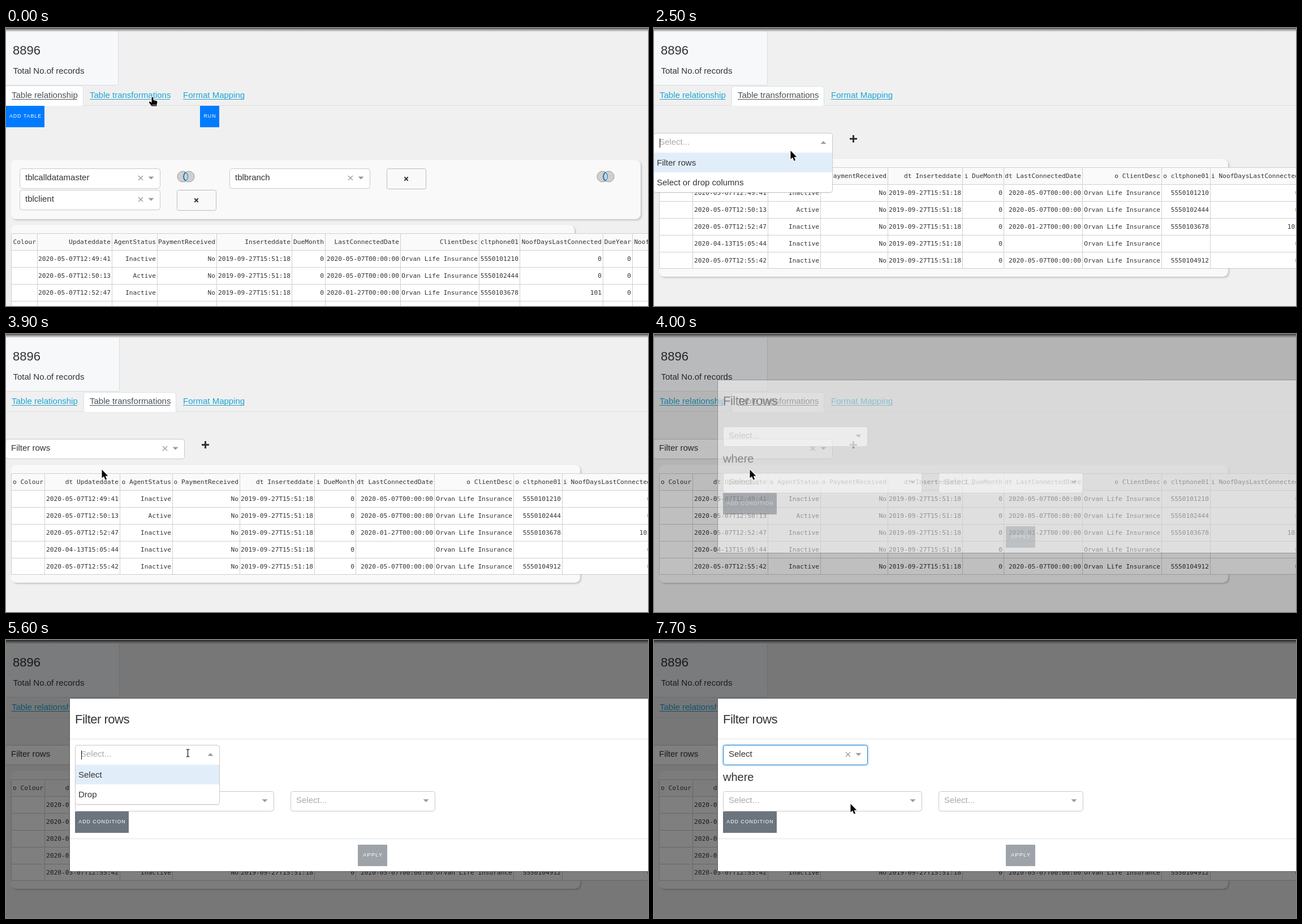
An HTML page with a canvas for the animation above (8000 ms loop, 1135x493 px).

```html
<!DOCTYPE html>
<html lang="en">
<head>
<meta charset="utf-8">
<title>Table transformations</title>
<style>
html, body { margin: 0; width: 100%; height: 100%; overflow: hidden; background: #f0f0f0; }
canvas { display: block; width: 1135px; height: 493px; }
</style>
</head>
<body>
<canvas id="stage" width="1135" height="493"></canvas>
<script>
const LOOP = 8000, W = 1135, H = 493;
const SANS = '"Liberation Sans", Arial, sans-serif';
const MONO = '"DejaVu Sans Mono", monospace';
const DARK = '#333', LINK = '#1ea5d2';
const g = document.getElementById('stage').getContext('2d');

const NAMES = ['Colour', 'Updateddate', 'AgentStatus', 'PaymentReceived', 'Inserteddate', 'DueMonth',
  'LastConnectedDate', 'ClientDesc', 'cltphone01', 'NoofDaysLastConnected', 'DueYear', 'NoofCalls'];
const TYPES = ['o', 'dt', 'o', 'o', 'dt', 'i', 'dt', 'o', 'o', 'i', 'i', 'i'];
const EDGES_PLAIN = [9, 55, 187, 267, 372, 505, 564, 697, 836, 908, 1055, 1107, 1173];
const EDGES_TYPED = [9, 68, 201, 294, 413, 545, 618, 757, 897, 983, 1142];
const row = (updated, status, last, phone, days) =>
  ['', updated, status, 'No', '2019-09-27T15:51:18', '0', last, 'Orvan Life Insurance', phone, days, '0', ''];
const MAY7 = '2020-05-07T00:00:00';
const ROWS = [
  row('2020-05-07T12:49:41', 'Inactive', MAY7, '5550101210', '0'),
  row('2020-05-07T12:50:13', 'Active', MAY7, '5550102444', '0'),
  row('2020-05-07T12:52:47', 'Inactive', '2020-01-27T00:00:00', '5550103678', '101'),
  row('2020-04-13T15:05:44', 'Inactive', '', '', '0'),
  row('2020-05-07T12:55:42', 'Inactive', MAY7, '5550104912', '0')
];

// time, x, y, shape
const POINTER = [
  [0, 257, 122, 'hand'], [1200, 255, 150, 'arrow'], [1300, 246, 196, 'arrow'], [1400, 241, 217, 'arrow'],
  [2600, 205, 228, 'arrow'], [2700, 169, 240, 'arrow'], [3100, 172, 240, 'hand'], [3400, 169, 240, 'arrow'],
  [4400, 300, 272, 'arrow'], [4500, 350, 233, 'arrow'], [4700, 332, 212, 'arrow'], [4800, 320, 199, 'arrow'],
  [5600, 321, 200, 'beam'], [6100, 292, 216, 'arrow'], [6200, 263, 235, 'hand'], [7100, 259, 235, 'arrow'],
  [7600, 305, 266, 'arrow'], [7700, 347, 290, 'arrow']
];

function text(str, x, y, size = 15, color = DARK, opt = {}) {
  g.font = `${opt.weight || 400} ${size}px ${opt.family || SANS}`;
  g.letterSpacing = `${opt.spacing || 0}px`;
  g.textAlign = opt.align || 'left';
  g.fillStyle = color;
  g.fillText(str, x, y);
  g.letterSpacing = '0px';
}

function rect(x, y, w, h, color) {
  g.fillStyle = color;
  g.fillRect(x, y, w, h);
}

function box(x, y, w, h, r, fill, stroke) {
  g.beginPath();
  g.roundRect(x + 0.5, y + 0.5, w, h, r);
  g.fillStyle = fill;
  g.fill();
  if (stroke) {
    g.strokeStyle = stroke;
    g.lineWidth = 1;
    g.stroke();
  }
}

function panel(x, y, w, h) {
  g.save();
  g.shadowColor = '#c4c4c4';
  g.shadowBlur = 3;
  g.shadowOffsetX = g.shadowOffsetY = 2;
  g.beginPath();
  g.roundRect(x, y, w, h, 9);
  g.fillStyle = '#f9f9f9';
  g.fill();
  g.restore();
}

function cross(x, y, size, color, width) {
  g.beginPath();
  g.moveTo(x - size, y - size); g.lineTo(x + size, y + size);
  g.moveTo(x + size, y - size); g.lineTo(x - size, y + size);
  g.strokeStyle = color;
  g.lineWidth = width;
  g.stroke();
}

function triangle(x, y, dir) {
  g.beginPath();
  g.moveTo(x - 5, y - 2.5 * dir);
  g.lineTo(x + 5, y - 2.5 * dir);
  g.lineTo(x, y + 2.5 * dir);
  g.fillStyle = '#999';
  g.fill();
}

function select(x, y, w, { value, focus, options, caret, pad = 10 } = {}) {
  if (focus) {
    g.beginPath();
    g.roundRect(x - 2.5, y - 2.5, w + 6, 41, 6);
    g.fillStyle = 'rgba(0,126,255,.12)';
    g.fill();
  }
  box(x, y, w, 35, options ? [4, 4, 0, 0] : 4, '#fff', focus ? '#1279c4' : '#c8c8c8');
  text(value || 'Select...', x + pad, y + 21, 15, value ? DARK : '#aaa');
  triangle(x + w - 15.5, y + 17, options ? -1 : 1);
  if (value) cross(x + w - 34, y + 17, 4, '#999', 1.3);
  if (!options) return;
  box(x, y + 35, w, 70, [0, 0, 4, 4], '#fff', '#c8c8c8');
  rect(x + 1, y + 35, w - 1, 35, '#e1eefa');
  rect(x + 1, y + 106, w - 1, 1, 'rgba(0,0,0,.07)');
  options.forEach((o, i) => text(o, x + 6, y + 58 + 35 * i));
  if (caret) rect(x + pad + 1, y + 10, 1, 16, '#111');
}

function button(label, x, y, w, color, size = 8.8) {
  rect(x, y, w, 38, color);
  text(label, x + w / 2 + 0.5, y + 21.3, size, '#fff', { align: 'center', spacing: 1 });
}

function removeButton(x, y) {
  box(x, y, 69, 36, 3, '#f9f9f9', '#bbb');
  cross(x + 34.5, y + 18.5, 3.2, '#333', 2);
}

function joinIcon(x, y) {
  const disc = dx => {
    g.beginPath();
    g.arc(x + dx, y, 9.5, 0, Math.PI * 2);
  };
  g.lineWidth = 1;
  for (const dx of [-5.5, 5.5]) {
    disc(dx);
    g.fillStyle = '#d0d0d0';
    g.fill();
    g.strokeStyle = '#999';
    g.stroke();
  }
  g.save();
  disc(-5.5); g.clip();
  disc(5.5);
  g.fillStyle = '#b5dcf6';
  g.fill();
  g.strokeStyle = '#3c6f94';
  g.lineWidth = 2;
  g.stroke();
  disc(5.5); g.clip();
  disc(-5.5);
  g.stroke();
  g.restore();
}

function table(top, edges, typed) {
  const step = 29.9, right = Math.min(edges[edges.length - 1], W + 9);
  const line = i => Math.round(top + step * i);
  rect(9, top, right - 9, 30, '#fafafa');
  rect(9, top + 30, right - 9, step * 5 - 1, '#fff');
  for (let i = 0; i <= 6; i++) rect(9, line(i), right - 8, 1, '#d0d0d0');
  for (const x of edges) rect(x, top, 1, line(6) - top + 1, '#d0d0d0');
  const head = NAMES.map((n, i) => typed ? `${TYPES[i]} ${n}` : n);
  [head, ...ROWS].forEach((cells, r) => {
    for (let c = 0; c < edges.length - 1; c++) {
      const clipped = typed && c === 9 && cells[c] === '0';
      text(cells[c], edges[c + 1] - 2, line(r) + 19, 11.2, clipped ? '#e08a35' : DARK,
        { family: MONO, align: 'right' });
    }
  });
}

function tab(label, x, w, { color = LINK, underline = true }) {
  text(label, x, 124, 15, color);
  if (underline) rect(x, 126, w, 1, color);
}

function header(second, t) {
  rect(0, 0, W, H, '#f0f0f0');
  const cardW = second ? 200 : 198;
  box(-2, 5, cardW + 2, 96, 2, '#f6f8fa', '#d9dcdf');
  rect(0, 0, W, 6, '#f0f0f0');
  const shade = g.createLinearGradient(0, 0, 0, 7);
  shade.addColorStop(0, 'rgba(0,0,0,.7)');
  shade.addColorStop(0.4, 'rgba(0,0,0,.35)');
  shade.addColorStop(1, 'rgba(0,0,0,0)');
  rect(0, 0, W, 7, shade);
  text('8896', 12, 47, 22);
  text('Total No.of records', 12.5, 81);

  rect(0, 137, W, 1, '#dcdfe2');
  if (second) box(137, 103, 163, 36, [4, 4, 0, 0], '#fff', '#dcdfe2');
  else box(-2, 102, 138, 37, [0, 4, 0, 0], '#fff', '#dcdfe2');
  rect(second ? 137 : 0, 138, second ? 164 : 138, 3, '#f0f0f0');
  const active = '#495057';
  tab('Table relationship', 10, 116, { color: second ? LINK : active });
  tab('Table transformations', 148, 142, {
    color: second ? active : t < 500 ? LINK : '#0f95c2',
    underline: t < 500 || t >= 2500
  });
  tab('Format Mapping', 313, 108, {});
}

function relationship() {
  button('ADD TABLE', 0, 138, 68, '#007bff');
  button('RUN', 343, 138, 34, '#007bff');
  panel(9, 234, 1113, 105);
  select(24, 249, 248, { value: 'tblcalldatamaster' });
  select(24, 287, 248, { value: 'tblclient' });
  select(395, 249, 248, { value: 'tblbranch' });
  removeButton(673, 249);
  removeButton(302, 287);
  joinIcon(318, 263.5);
  joinIcon(1060, 263.5);
  panel(9, 349, 996, 200);
  table(364, EDGES_PLAIN, false);
}

function transformations(t) {
  panel(9, 232, 1006, 209);
  table(247, EDGES_TYPED, true);
  rect(346, 195, 13, 3, DARK);
  rect(351, 190, 3, 13, DARK);
  const open = t >= 2500 && t < 3400;
  select(-1, 186, 316, {
    value: t >= 3400 ? 'Filter rows' : '',
    focus: t >= 3400 && t < 3900,
    options: open && ['Filter rows', 'Select or drop columns'],
    caret: open
  });
}

function modal(t) {
  const p = Math.min(1, Math.floor((t - 3900) / 100) / 3);
  if (p <= 0) return;
  const fade = Math.min(1, p * 1.5);
  rect(0, 0, W, H, `rgba(0,0,0,${0.5 * fade})`);
  g.save();
  g.globalAlpha = fade;
  g.translate(0, Math.round(-50 * (1 - p) ** 2));
  box(112, 103, 1100, 307, 1, '#fff', '#5c5c5c');
  rect(113, 175, W, 1, '#dee2e6');
  rect(113, 352, W, 1, '#dee2e6');
  text('Filter rows', 122, 148, 22, DARK, { spacing: -0.5 });
  text('where', 122, 250, 20);
  button('ADD CONDITION', 122, 304, 95, '#6c757d');
  button('APPLY', 622, 363, 52, '#9da3a9', 9.6);
  select(122, 268, 351);
  select(503, 268, 255);
  const open = t >= 5600 && t < 7100;
  select(122, 186, 255, {
    value: t >= 7100 ? 'Select' : '',
    focus: t >= 7100,
    options: open && ['Select', 'Drop'],
    caret: open && t < 6700
  });
  g.restore();
}

const SHAPES = {
  arrow: new Path2D('M0 0V15L3.5 12L6 18L8.6 17L6.1 11.2H10.8Z'),
  hand: new Path2D('M0 1Q1.5 -1 3 1V5.5L8 6.5Q10 7 10 9L9 13V16H0L-4.5 10Q-5 7.5 -2.5 8L0 10Z'),
  beam: new Path2D('M-3 -6.5H-1L0 -5.5L1 -6.5H3M0 -5.5V5.5M-3 6.5H-1L0 5.5L1 6.5H3')
};

function pointer(t) {
  const [, x, y, kind] = POINTER.filter(k => k[0] <= t).pop();
  const shape = SHAPES[kind];
  g.save();
  g.translate(x + 0.5, y + 0.5);
  g.lineJoin = 'round';
  g.strokeStyle = '#fff';
  g.lineWidth = kind === 'beam' ? 3 : 2;
  g.stroke(shape);
  if (kind === 'beam') {
    g.strokeStyle = '#111';
    g.lineWidth = 1.2;
    g.stroke(shape);
  } else {
    g.fillStyle = '#080808';
    g.fill(shape);
  }
  if (kind === 'hand') rect(1, 13.5, 7, 0.8, '#ddd');
  g.restore();
}

function draw(t) {
  const second = t >= 700;
  header(second, t);
  if (second) transformations(t);
  else relationship();
  modal(t);
  pointer(t);
}

const start = performance.now();
function tick() {
  draw((performance.now() - start) % LOOP);
  requestAnimationFrame(tick);
}
tick();
</script>
</body>
</html>
```
